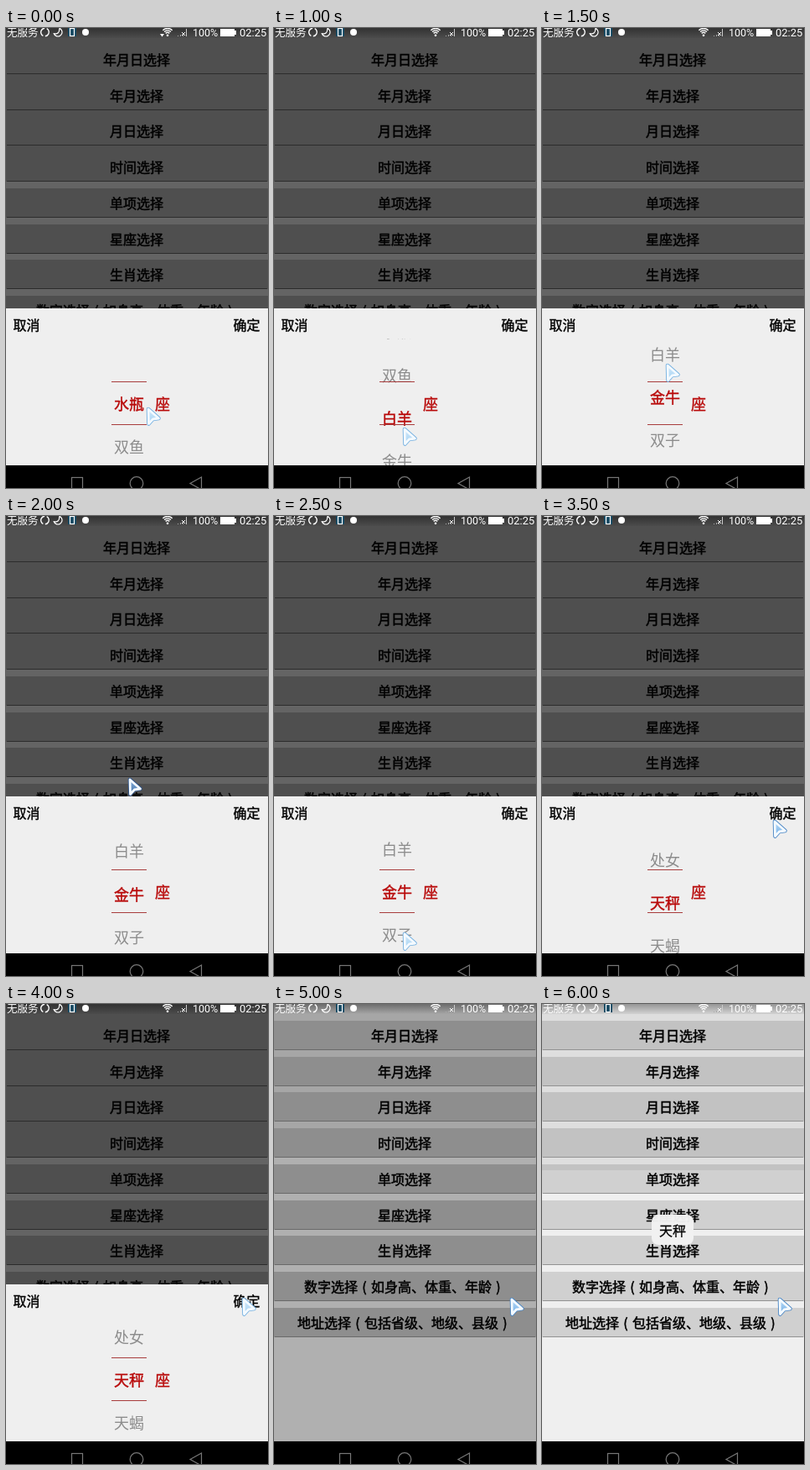
Animation, 313 px wide and 548 px high, one loop 6.5 s. Source, as an HTML page with a canvas:

```html
<!DOCTYPE html>
<html lang="zh-CN">
<head>
<meta charset="utf-8">
<style>
html, body { margin: 0; width: 100%; height: 100%; overflow: hidden; background: #000; }
canvas { display: block; }
</style>
</head>
<body>
<canvas id="stage" width="313" height="548"></canvas>
<script>
const ctx = document.getElementById('stage').getContext('2d');
const LOOP = 6500;
const FONT = '"Noto Sans CJK SC", "Noto Sans CJK", sans-serif';
// third-em spaces centre the brackets in a full-width cell
const bracket = str => `\u2004(\u2004${str}\u2004)\u2004`;
const ROWS = ['年月日选择', '年月选择', '月日选择', '时间选择', '单项选择', '星座选择', '生肖选择',
  '数字选择' + bracket('如身高、体重、年龄'), '地址选择' + bracket('包括省级、地级、县级')];
const SIGNS = ['水瓶', '双鱼', '白羊', '金牛', '双子', '巨蟹', '狮子', '处女', '天秤', '天蝎', '射手', '摩羯'];

const DIM = { bg: '#646464', button: '#4f4f4f', topBg: '#4f4f4f', topButton: '#4f4f4f', split: 183, line: '#2c2c2c', bar: ['#323232', '#4c4c4c'] };
const HALF = { bg: '#b0b0b0', button: '#8e8e8e', topBg: '#a6a6a6', topButton: '#8e8e8e', split: 183, line: '#696969', bar: ['#6c6c6c', '#a6a6a6'] };
const FULL = { bg: '#efefef', button: '#d0d0d0', topBg: '#dedede', topButton: '#c2c2c2', split: 198, line: '#929292', bar: ['#969696', '#d2d2d2'] };

const LIGHT = ['#d6ecfb', '#a3d0f2', '#74b0e0'];
const DARK = ['#8db4dc', '#3f6ea8', '#2d5288'];
const MID = ['#c4e2fa', '#68a8e4', '#4a86c4'];

// start time, wheel position in rows, cursor x, y, cursor colours, theme
const STEPS = [
  [0, 0, 168, 452, LIGHT, DIM],
  [500, 0, 148, 372, DARK, DIM],
  [1000, 1.67, 154, 476, LIGHT, DIM],
  [1500, 3.16, 148, 400, LIGHT, DIM],
  [2000, 2.95, 146, 312, DARK, DIM],
  [2500, 3, 154, 496, LIGHT, DIM],
  [3000, 5, 237, 310, DARK, DIM],
  [3500, 7.75, 276, 362, MID, DIM],
  [4000, 8, 282, 350, LIGHT, DIM],
  [5000, 8, 282, 350, MID, HALF],
  [6000, 8, 282, 350, MID, FULL]
];

function rect(x, y, w, h, color) {
  ctx.fillStyle = color;
  ctx.fillRect(x, y, w, h);
}

function text(str, x, centerY, size, color, { align = 'center', font = FONT, bold = 0 } = {}) {
  const y = Math.round(centerY + size * 0.38);
  ctx.font = `${size}px ${font}`;
  ctx.textAlign = align;
  ctx.fillStyle = ctx.strokeStyle = color;
  ctx.fillText(str, x, y);
  if (!bold) return;
  ctx.lineWidth = bold;
  ctx.strokeText(str, x, y);
}

function path(points, close = true) {
  ctx.beginPath();
  points.forEach(([x, y]) => ctx.lineTo(x, y));
  if (close) ctx.closePath();
}

function arc(x, y, r, from = 0, to = 2 * Math.PI) {
  ctx.beginPath();
  ctx.arc(x, y, r, from, to);
}

function vertical(y0, y1, [top, bottom]) {
  const gradient = ctx.createLinearGradient(0, y0, 0, y1);
  gradient.addColorStop(0, top);
  gradient.addColorStop(1, bottom);
  return gradient;
}

function drawStatus(theme, busy) {
  const latin = { align: 'left', font: 'Roboto, sans-serif' };
  rect(0, 0, 313, 12, vertical(0, 12, theme.bar));
  text('无服务', 1, 5.5, 12.5, '#fff', { align: 'left' });
  ctx.strokeStyle = ctx.fillStyle = '#fff';
  ctx.lineWidth = 1.4;
  for (const start of [-1.1, 2.04]) {
    arc(46.5, 5, 4.8, start, start + 2.6);
    ctx.stroke();
  }
  ctx.lineWidth = 1.2;
  ctx.beginPath();
  ctx.arc(62, 5, 5, -1.2, 2.8);
  ctx.quadraticCurveTo(64, 8, 63.8, 0.3);
  ctx.stroke();
  rect(74, 0, 10, 10, '#174a63');
  ctx.strokeRect(76.5, 0.5, 5, 9);
  ctx.fillStyle = '#fff';
  arc(95, 5, 4);
  ctx.fill();

  ctx.lineWidth = 1.4;
  for (const r of [3.5, 6, 8.5]) {
    arc(193, 9, r, -2.3, -0.84);
    ctx.stroke();
  }
  arc(193, 8.8, 1.3);
  ctx.fill();
  if (busy) {
    path([[184, 7], [189, 7], [186.5, 10.5]]);
    ctx.fill();
  }
  [0, 1, 2].forEach(i => rect(205 + 3 * i, 9 - i, 1, 1 + i, '#aaa'));
  rect(215, 1, 1, 9, '#ccc');
  ctx.lineWidth = 1;
  path([[210, 5], [214, 9]], false);
  ctx.stroke();
  path([[214, 5], [210, 9]], false);
  ctx.stroke();
  text('100%', 223, 5.5, 12.5, '#fff', latin);
  rect(256, 1, 17, 9, '#fff');
  rect(273, 3, 2, 5, '#fff');
  text('02:25', 279, 5.5, 13, '#fff', latin);
}

function drawList(theme) {
  const paint = (bg, button) => {
    rect(0, 12, 313, 509, bg);
    ROWS.forEach((label, i) => {
      const y = Math.round(20 + i * 42.7);
      rect(0, y, 313, 35, button);
      rect(1, y + 34, 311, 1, theme.line);
    });
  };
  paint(theme.bg, theme.button);
  ctx.save();
  ctx.beginPath();
  ctx.rect(0, 0, 313, theme.split);
  ctx.clip();
  paint(theme.topBg, theme.topButton);
  ctx.restore();
  ROWS.forEach((label, i) => text(label, 156, 38 + i * 42.7, 16, '#000', { bold: 0.5 }));
}

function drawPicker(position) {
  rect(0, 334, 313, 187, '#efefef');
  text('取消', 8.4, 354, 16, '#000', { align: 'left', bold: 0.4 });
  text('确定', 271.6, 354, 16, '#000', { align: 'left', bold: 0.4 });
  ctx.save();
  ctx.beginPath();
  ctx.rect(0, 370, 313, 151);
  ctx.clip();
  SIGNS.forEach((sign, i) => {
    const selected = i === Math.round(position);
    text(sign, 147, 448.3 + (i - position) * 51.3, 18, selected ? '#b80808' : '#8c8c8c', { bold: selected ? 0.4 : 0 });
  });
  ctx.restore();
  rect(126, 421, 42, 1, '#a83c3c');
  rect(126, 472, 42, 1, '#a83c3c');
  text('座', 187, 448.3, 18, '#b80808', { bold: 0.3 });
}

function drawToast(label) {
  ctx.fillStyle = 'rgba(242,242,242,.97)';
  ctx.beginPath();
  ctx.roundRect(131, 251, 50, 36, 8);
  ctx.fill();
  text(label, 156, 270, 16, '#000', { bold: 0.3 });
}

function drawNav() {
  rect(0, 521, 313, 27, '#000');
  ctx.strokeStyle = '#777';
  ctx.lineWidth = 1.2;
  ctx.strokeRect(78.5, 535.5, 13, 14);
  arc(156, 542.5, 7.8);
  ctx.stroke();
  path([[220, 542.5], [233.5, 535], [233.5, 550]]);
  ctx.stroke();
}

function drawCursor(x, y, [top, bottom, edge]) {
  ctx.save();
  ctx.translate(x, y);
  ctx.lineJoin = 'round';
  path([[2, 2], [14.5, 13], [7.5, 14], [2.5, 19.5]]);
  ctx.lineWidth = 4.6;
  ctx.strokeStyle = edge;
  ctx.stroke();
  ctx.fillStyle = vertical(0, 21, [top, bottom]);
  ctx.fill();
  ctx.lineWidth = 2.8;
  ctx.strokeStyle = '#f4faff';
  ctx.stroke();
  ctx.restore();
}

function draw(time) {
  const [start, position, x, y, colors, theme] = STEPS.findLast(step => step[0] <= time);
  drawList(theme);
  drawStatus(theme, start < 1000);
  if (theme === DIM) drawPicker(position);
  if (theme === FULL) drawToast(SIGNS[position]);
  drawNav();
  drawCursor(x, y, colors);
}

const origin = performance.now();
function tick() {
  draw((performance.now() - origin) % LOOP);
  requestAnimationFrame(tick);
}
tick();
</script>
</body>
</html>
```
